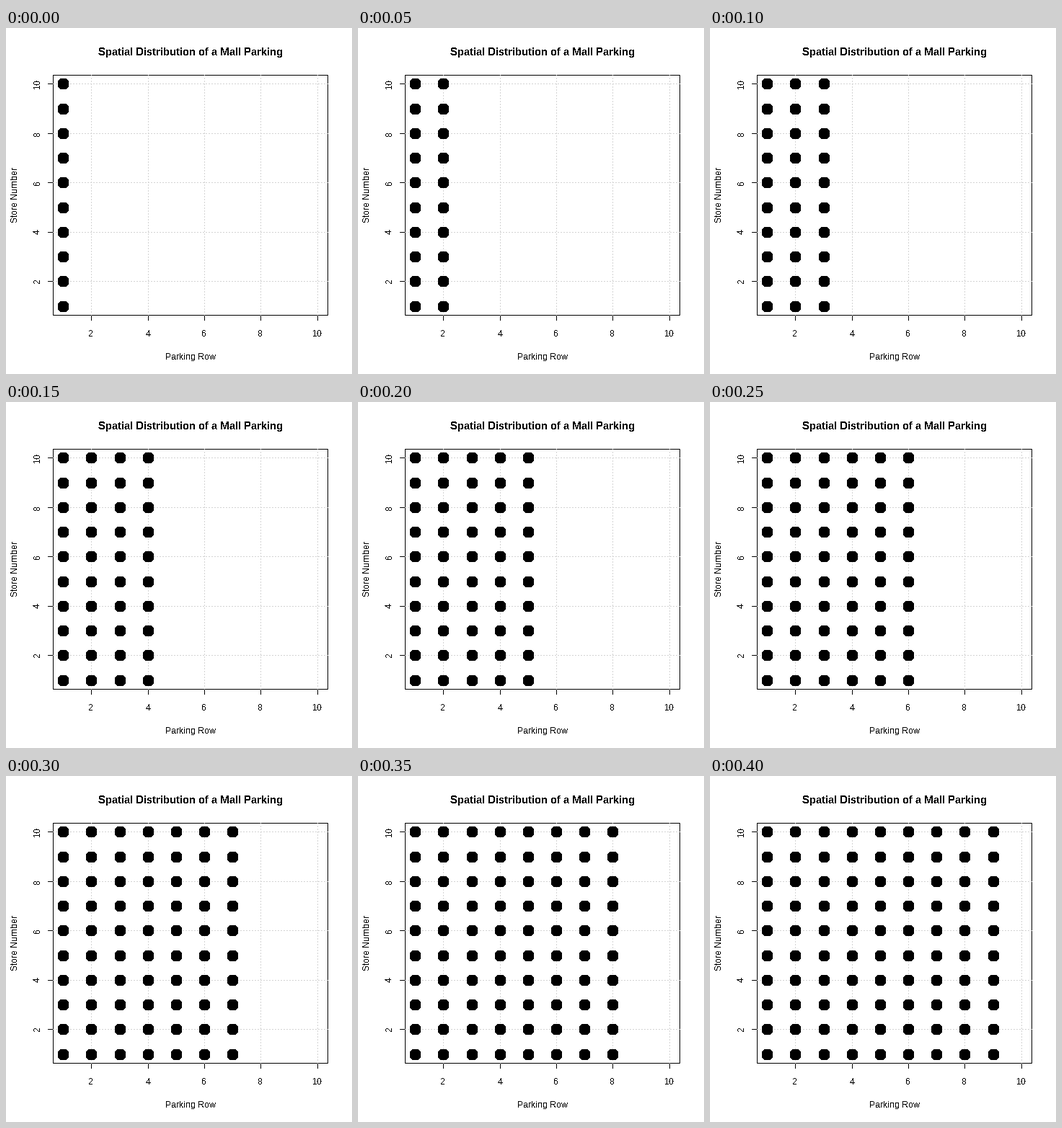
A matplotlib script for the animation above (500 ms loop, 480 by 480 pixels).

```python
import matplotlib
import matplotlib.pyplot as plt
from matplotlib.animation import FuncAnimation
from matplotlib.patches import Ellipse

matplotlib.rcParams.update({
    "toolbar": "None",
    "text.antialiased": False,
    "text.hinting": "native",
    "text.hinting_factor": 1,
})

SIZE, DPI = 480, 72    # one point is one pixel
LEFT, RIGHT, TOP, BOTTOM = 65, 446, 65, 398
FRAMES, COLS, ROWS, DOT = 10, 9, 10, 15

fig = plt.figure(figsize=(SIZE / DPI, SIZE / DPI), dpi=DPI, facecolor="white")
ax = fig.add_axes([0, 0, 1, 1])
ax.set_xlim(0, SIZE)
ax.set_ylim(SIZE, 0)
ax.axis("off")


def col_x(n):
    return int(40.53 + 39.177 * n)


def row_y(n):
    return int(420.31 - 34.239 * n)


def line(xs, ys):
    # whole numbers name pixels, so strokes run through their middles
    ax.plot([x + 0.5 for x in xs], [y + 0.5 for y in ys], color="black", lw=1,
            snap=False, solid_capstyle="projecting",
            solid_joinstyle="miter", zorder=1)


def grid_line(xs, ys):
    ax.plot(xs, ys, color="lightgray", lw=1, ls=(0, (2, 2)), snap=False,
            dash_capstyle="butt", zorder=2)


def label(x, y, text, size=12, angle=0, weight="normal"):
    # (x, y) is the middle of the baseline
    ax.text(x, y, text, fontsize=size, family="Liberation Sans",
            weight=weight, rotation=angle, rotation_mode="anchor",
            ha="center", va="baseline", zorder=4)


line([LEFT, RIGHT, RIGHT, LEFT, LEFT], [TOP, TOP, BOTTOM, BOTTOM, TOP])

for n in range(2, 11, 2):
    x, y = col_x(n), row_y(n)
    grid_line([x + 0.5, x + 0.5], [BOTTOM + 1, TOP])
    grid_line([LEFT, RIGHT + 1], [y + 0.5, y + 0.5])
    line([x, x], [BOTTOM, BOTTOM + 7])
    line([LEFT - 7, LEFT], [y, y])
    label(x, 428, str(n))
    label(47, y, str(n), angle=90)

label(255.5, 38, "Spatial Distribution of a Mall Parking", 15, weight="bold")
label(256, 460, "Parking Row")
label(16, 231, "Store Number", angle=90)

columns = []
for c in range(1, COLS + 1):
    column = []
    for r in range(1, ROWS + 1):
        spot = Ellipse((col_x(c) + 0.5, row_y(r) + 0.5), DOT, DOT,
                       fc="black", lw=0, antialiased=False, zorder=3)
        column.append(ax.add_patch(spot))
    columns.append(column)


def update(i):
    for c, column in enumerate(columns):
        for spot in column:
            spot.set_visible(c <= i)
    return [spot for column in columns for spot in column]


anim = FuncAnimation(fig, update, frames=FRAMES, interval=50,
                     init_func=lambda: update(0), repeat=True, repeat_delay=0)
plt.show()
```
